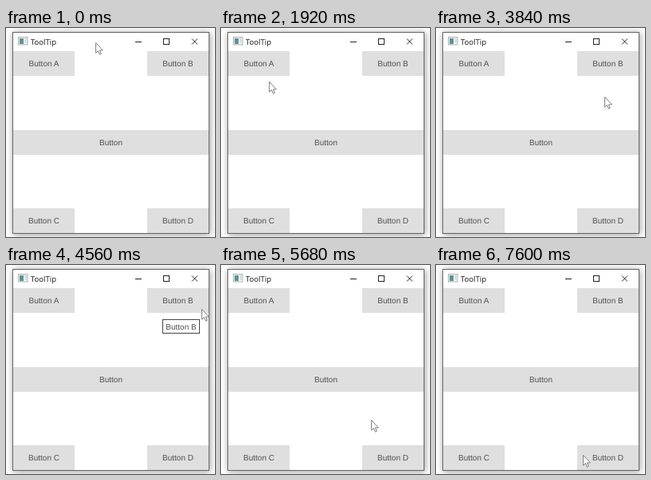
An HTML page that plays this animation: 262x262 px, repeating every 8000 ms.

```html
<!DOCTYPE html>
<html lang="en">
<head>
<meta charset="utf-8">
<title>ToolTip</title>
<style>
  html, body { margin: 0; width: 100%; height: 100%; overflow: hidden; background: #fff; }
  svg { display: block; width: 100%; height: 100%; }
  text { font: 10px "Liberation Sans", Arial, sans-serif; fill: #505050; text-anchor: middle; text-rendering: geometricPrecision; }
  .title { font: 9.5px "Open Sans", "Noto Sans", sans-serif; fill: #111; text-anchor: start; }
  .window { fill: #fff; stroke: #666; filter: drop-shadow(1px 1px 4px rgba(0, 0, 0, .42)); }
  .button { fill: #dfdfdf; }
  .controls { fill: none; stroke: #222; }
  .tip { visibility: hidden; }
  .tip rect { fill: #fff; stroke: #444; }
  .cursor { fill: #fff; stroke: #707070; stroke-width: .9; stroke-linejoin: round; }
</style>
</head>
<body>
<svg viewBox="0 0 262 262">
  <rect class="window" x="8.5" y="5.5" width="246" height="252"/>
  <g class="icon">
    <rect x="15.5" y="11.5" width="11.5" height="9.5" fill="#f4f6f6" stroke="#aab2b5"/>
    <rect x="17" y="13" width="5" height="7" fill="#62918d"/>
    <path d="M23 13.5h3M23 15.5h3M23 17.5h3" stroke="#c3cbce"/>
  </g>
  <text class="title" x="31" y="20.6">ToolTip</text>
  <g class="controls">
    <path d="M162 17.5h8"/>
    <rect x="197.5" y="13.5" width="7" height="7"/>
    <path d="M233 13.5l7 7M240 13.5l-7 7"/>
  </g>
  <g id="buttons"></g>
  <g id="tips"></g>
  <path id="cursor" class="cursor" d="M.6 .5V13.2L3.5 10.6L5.4 15.2L7.3 14.4L5.5 9.9H9.4Z"/>
</svg>
<script>
  const LOOP = 8000;
  const STEP = 80;
  const LEFT = 9, TOP = 29, RIGHT = 254, BOTTOM = 257;
  const BUTTON = { width: 77, height: 31 };
  const TIP = { width: 47, height: 18 };

  // Each move follows a cubic curve from the previous resting point.
  const moves = [
    { start: 80, steps: 9, curve: [[100, 105], [-35, 107], [43, 43]], label: "Button A", shown: 1120 },
    { start: 1920, steps: 9, curve: [[94, 131], [150, 70], [192, 51]], label: "Button B", shown: 2960 },
    { start: 3680, steps: 8, curve: [[200, 101], [240, 100], [245, 55]], label: "Button B", shown: 4560 },
    { start: 5280, steps: 9, curve: [[136, 80], [186, 237], [222, 232]], label: "Button D", shown: 6400 },
    { start: 7200, steps: 6, curve: [[210, 198], [188, 198], [184, 238]] }
  ];

  function add(parent, tag, attrs, text = "") {
    const node = document.createElementNS("http://www.w3.org/2000/svg", tag);
    for (const name in attrs) node.setAttribute(name, attrs[name]);
    node.textContent = text;
    return parent.appendChild(node);
  }

  // Plays [time, style] pairs as hard cuts, holding the last one to the end.
  function playSteps(node, steps) {
    const frames = steps.map(([time, style]) => ({ ...style, offset: time / LOOP, easing: "step-end" }));
    frames.push({ ...steps[steps.length - 1][1], offset: 1 });
    return node.animate(frames, { duration: LOOP, iterations: Infinity });
  }

  function cubic(a, b, c, d, u) {
    const v = 1 - u;
    return v * v * v * a + 3 * v * v * u * b + 3 * v * u * u * c + u * u * u * d;
  }

  function place([x, y]) {
    return { transform: `translate(${Math.round(x)}px, ${Math.round(y)}px)` };
  }

  function addButton(label, x, y, width = BUTTON.width) {
    const layer = document.getElementById("buttons");
    add(layer, "rect", { class: "button", x, y, width, height: BUTTON.height });
    add(layer, "text", { x: x + width / 2, y: y + 19.4 }, label);
  }

  // Opens below right of the pointer, flipping where the window ends.
  function addTip(label, [px, py]) {
    const x = px + 2 + TIP.width > RIGHT ? px - TIP.width - 2 : px + 2;
    const y = py + 13 + TIP.height > BOTTOM ? py - TIP.height - 3 : py + 13;
    const tip = add(document.getElementById("tips"), "g", { class: "tip" });
    add(tip, "rect", { x: x + .5, y: y + .5, width: TIP.width - 1, height: TIP.height - 1 });
    add(tip, "text", { x: x + TIP.width / 2, y: y + 12.5 }, label);
    return tip;
  }

  const lastColumn = RIGHT - BUTTON.width;
  const lastRow = BOTTOM - BUTTON.height;
  addButton("Button A", LEFT, TOP);
  addButton("Button B", lastColumn, TOP);
  addButton("Button", LEFT, (TOP + lastRow) / 2 + .5, RIGHT - LEFT);
  addButton("Button C", LEFT, lastRow);
  addButton("Button D", lastColumn, lastRow);

  const animations = [];
  let rest = [112, 18];
  const path = [[0, place(rest)]];

  moves.forEach(({ start, steps, curve: [c1, c2, end], label, shown }, index) => {
    for (let i = 1; i <= steps; i++) {
      const point = [0, 1].map(axis => cubic(rest[axis], c1[axis], c2[axis], end[axis], i / steps));
      path.push([start + (i - 1) * STEP, place(point)]);
    }
    rest = end;
    if (!label) return;
    animations.push(playSteps(addTip(label, end), [
      [0, { visibility: "hidden" }],
      [shown, { visibility: "visible" }],
      [moves[index + 1].start, { visibility: "hidden" }]
    ]));
  });
  animations.push(playSteps(document.getElementById("cursor"), path));

  const origin = document.timeline.currentTime ?? 0;
  for (const animation of animations) animation.startTime = origin;
</script>
</body>
</html>
```
